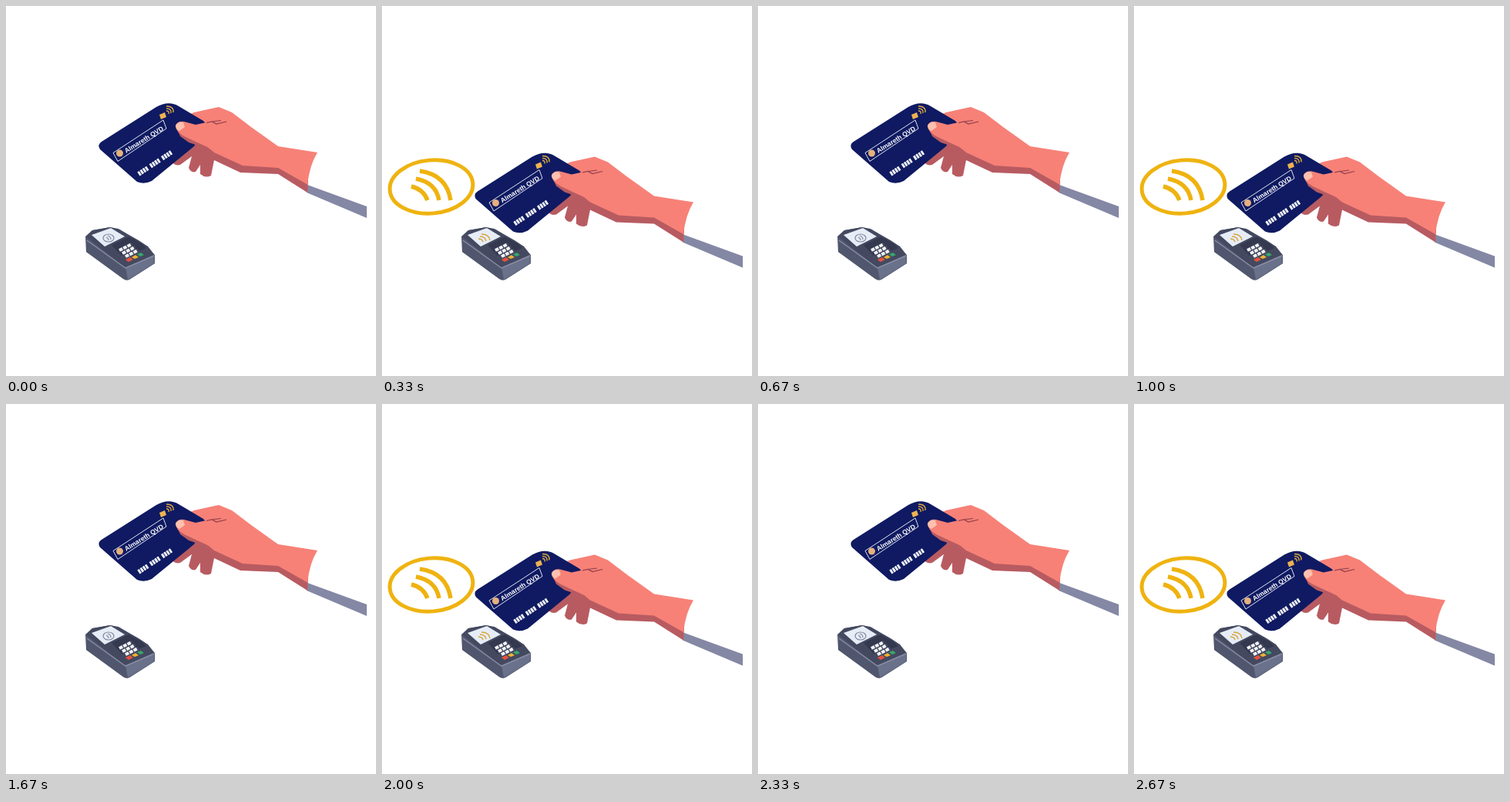
Write an HTML page that moves like this. It is 480 by 480 pixels and loops after 3.01 s.

```html
<!DOCTYPE html>
<html lang="en">
<head>
<meta charset="utf-8">
<title>Contactless payment</title>
<style>
html, body { margin: 0; width: 100%; height: 100%; overflow: hidden; background: #fff; }
svg { display: block; width: 100vw; height: 100vh; }
text { font: bold 8.5px "Liberation Sans", Arial, sans-serif; fill: #fff; }
.line { fill: none; }
.near .up, .far .down { display: none; }
.near #arm { transform: translateY(64.5px); }
</style>
</head>
<body>
<svg id="stage" class="far" viewBox="0 0 480 480">
  <!-- card reader -->
  <g id="reader">
    <path fill="#50566d" d="M103 299L112 291 135 287 146 289 184 312 193 323V334L160 355Q156 357 152 354L104 319Z"/>
    <path fill="#444960" d="M104 299L112 291 135 287 147 290 172 304 184 312 192 323 156 339 149 335Z"/>
    <path fill="#6a718b" d="M155 339L192 323V334L158 355Z"/>
    <path class="line" stroke="#858ca3" stroke-width="1.5" d="M105 304L155 340 192 324"/>
    <path fill="#e6edf7" d="M111 297L136 288 154 299 128 312Z"/>
    <path fill="#343950" d="M137 310L159 299 176 308 182 314 163 322 150 324Z"/>
    <path class="line" stroke="#f1f3f8" stroke-width="4" stroke-dasharray="4.7 1.2" d="M147 317L163 309M151 321L167 313M155 325L171 317"/>
    <path fill="#e5533d" d="M155 329L161 326 165 329 159 332Z"/>
    <path fill="#f0b52e" d="M163 326L168 323 172 326 167 328Z"/>
    <path fill="#36a968" d="M170 322L175 320 179 323 174 325Z"/>
    <g class="up line" stroke="#81889b" stroke-width="1.2">
      <ellipse cx="133" cy="301" rx="7" ry="5"/>
      <path d="M132 298Q136 299 136 303M130 300Q133 301 133 304"/>
    </g>
    <path class="down line" stroke="#d9a63b" stroke-width="1.5" d="M129 296Q139 296 140 304M127 299Q134 299 135 305M125 302Q130 302 131 306"/>
  </g>

  <!-- contactless sign -->
  <g class="down line" stroke="#efb310">
    <ellipse cx="64" cy="234.500" rx="54" ry="34.500" stroke-width="5" transform="rotate(-5 64 234.500)"/>
    <path stroke-width="5.5" d="M49 214Q84 219 89 252M44 224Q70 229 74 252M38 234Q54 238 59 252"/>
  </g>

  <g id="arm">
    <path fill="#8488a4" d="M391 232L468 260V275L390 242Z"/>
    <!-- shaded fingers and underside, then the lit hand -->
    <path fill="#b85b61" d="M238 176L215 200Q217 208 226 206L241 195 237 210Q240 217 246 215L252 206V218Q259 224 266 220L270 200 304 216 353 218 391 242 392 225 330 185 262 172Z"/>
    <path fill="#f78177" d="M226 146L244 138 276 131 293 138 318 157 353 182 404 190Q394 206 391 231.500L353 210 307 207 270 190 258 180 226 168Z"/>

    <!-- card, behind the thumb -->
    <path fill="#0f1a62" d="M122 186Q118 180 124 176L195 131Q211 122 224 130L256 149Q261 153 257 159L244 182 189 227Q179 232 170 228Z"/>
    <path class="line" stroke="#dfe3ef" d="M139 190.500L204 148 208 159 145 201.500Z"/>
    <circle cx="147.500" cy="191" r="4.500" fill="#e6b17e"/>
    <text transform="translate(156 191) rotate(-32)">Almareth QVD</text>
    <path class="line" stroke="#f4f5fa" stroke-width="6" stroke-dasharray="2.8 1 2.8 1 2.8 1 2.8 4.2" d="M172 218L216.500 188.500"/>
    <path fill="#eeb251" d="M199 141L206 138 208 144 201 147Z"/>
    <path class="line" stroke="#dda83f" stroke-width="1.4" d="M208 136Q212 136 211 140M208 133Q215 133 214 139M208 130Q218 130 217 138"/>
    <path fill="#b85b61" d="M222 160L226 169 237 177 246 180 252 174Z"/>
    <path fill="#f78177" d="M220 155Q223 149 231 150L246 154 260 151 268 186 248 177 231 169Q220 163 220 155Z"/>
    <path fill="#ffc0ad" d="M220 155Q223 149 230 151L232 157 225 162Q220 160 220 155Z"/>
    <path class="line" stroke="#8f3e4c" stroke-width="1.2" d="M260 151.500L267 150 273 153 286 150M267 150L279 148.500"/>
  </g>
</svg>
<script>
const stage = document.getElementById("stage");
const times = [0, 330, 670, 1000, 1330, 1670, 2000, 2330, 2670];
const poses = "010100101"; // 1: card held near the reader
const loop = 3010;

function draw() {
  const t = performance.now() % loop;
  const step = times.filter(start => start <= t).length - 1;
  stage.setAttribute("class", poses[step] === "1" ? "near" : "far");
  requestAnimationFrame(draw);
}
draw();
</script>
</body>
</html>
```
